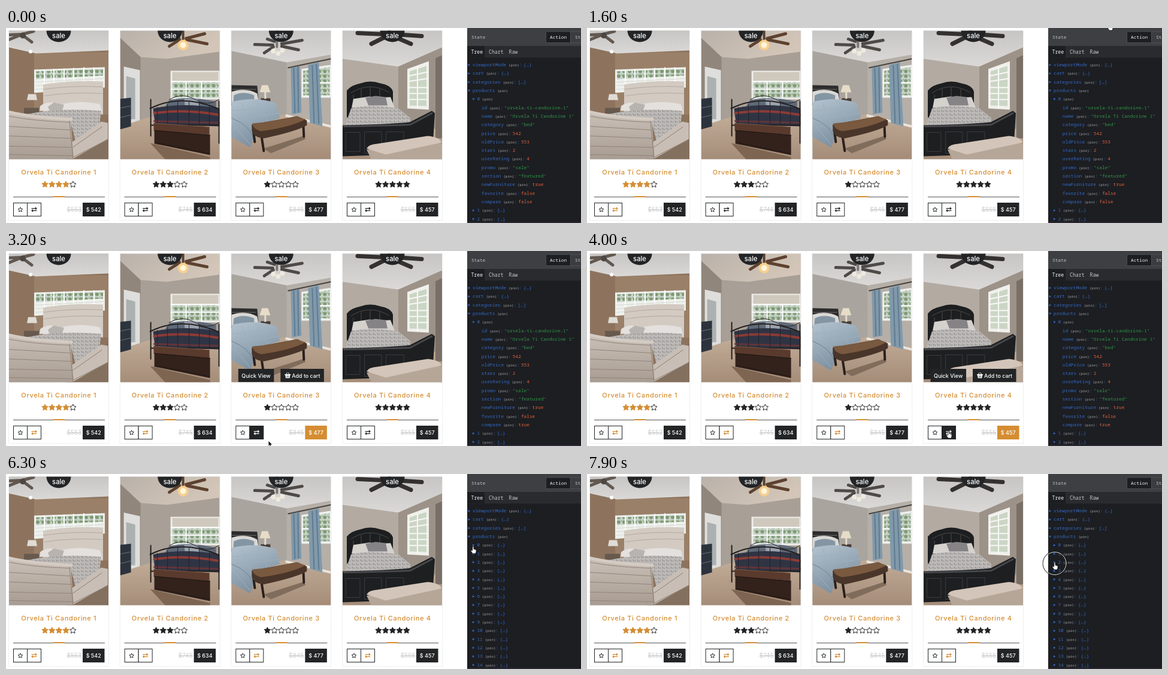
An HTML page for the animation above (8 s loop, 960 by 326 pixels).

```html
<!DOCTYPE html>
<html lang="en">
<head>
<meta charset="utf-8">
<title>Furniture shop with state inspector</title>
<style>
html, body { margin: 0; width: 100%; height: 100%; overflow: hidden; background: #fff; }
svg { display: block; width: 960px; height: 326px; }
text { font-family: Inter, "Open Sans", sans-serif; font-weight: 500; white-space: pre; }
.mono { font: 7.8px "Noto Sans Mono", "DejaVu Sans Mono", monospace; }
.tab { font-size: 8.2px; }
.pin { font-size: 5.9px; fill: #a9abad; }
.line { fill: none; stroke-linecap: round; stroke-linejoin: round; }
</style>
</head>
<body>
<svg viewBox="0 0 960 326">
<defs>
  <linearGradient id="ceiling" x2="0" y2="1"><stop stop-color="#c6c5c4"/><stop offset="1" stop-color="#dbd9d7"/></linearGradient>
  <linearGradient id="warm" x2="1" y2=".4"><stop stop-color="#b9b1aa"/><stop offset="1" stop-color="#d3c6b8"/></linearGradient>
  <linearGradient id="carpet" x2="0" y2="1"><stop stop-color="#c0ab97"/><stop offset="1" stop-color="#a48c78"/></linearGradient>
  <linearGradient id="bluebed" x2=".4" y2="1"><stop stop-color="#b4c3cf"/><stop offset="1" stop-color="#7c8f9f"/></linearGradient>
  <linearGradient id="wood" x2="0" y2="1"><stop stop-color="#c9bfb6"/><stop offset="1" stop-color="#a89c92"/></linearGradient>
  <pattern id="floral" width="7" height="6" patternUnits="userSpaceOnUse">
    <rect width="7" height="6" fill="#bdbab8"/><path d="M1 1q3 0 2 3M5 2l1 2" stroke="#83817f" fill="none"/>
  </pattern>
  <pattern id="trees" width="9" height="8" patternUnits="userSpaceOnUse">
    <rect width="9" height="8" fill="#c9d6cc"/><circle cx="3" cy="4" r="3" fill="#7f9873"/><circle cx="8" cy="2" r="1.5" fill="#9fb493"/>
  </pattern>

  <symbol id="photo0" viewBox="0 0 166 215">
    <path fill="#8d735d" d="M0 0H166V215H0z"/>
    <path fill="#9a8069" d="M42 36H166V140H42z"/>
    <path fill="url(#ceiling)" d="M0 0H166V33L45 38 0 28z"/>
    <path fill="#eef0ec" d="M42 65L160 61V95L42 104z"/>
    <path fill="url(#trees)" d="M45 68L157 64V75L45 81z"/>
    <path class="line" stroke="#fff" stroke-width="2" d="M59 66V104M75 65V103M92 64V101M108 63V100M125 62V99M142 62V98"/>
    <path class="line" stroke="#d6dad2" d="M44 86L158 80M44 92L158 86M44 98L158 91"/>
    <path fill="#d3cac2" d="M57 90Q105 82 157 85V140H57z"/>
    <path class="line" stroke="#b3a9a0" d="M58 98Q105 91 156 94M59 109Q105 102 156 105"/>
    <path fill="#e0dcd5" d="M32 106h13l2 10H30z"/><path fill="#67594d" d="M25 129h25v11H25z"/>
    <path fill="#e3e0dd" d="M52 126q13-10 35-3l3 11H51zM90 122q30-6 62 1l4 14H90z"/>
    <path fill="#b8b3ae" d="M65 127l10-7 17 4-4 11H68z"/>
    <path fill="#84705e" d="M95 190L166 150V215H95z"/>
    <path fill="url(#floral)" d="M28 140Q85 128 154 134L151 159 112 188 102 150z"/>
    <path fill="#c8beb5" d="M104 187L154 152 165 154V181L107 214z"/>
    <path class="line" stroke="#8c7f74" d="M106 212L165 182M105 196L155 161"/>
    <path fill="url(#wood)" d="M0 137Q24 145 103 148L108 215H0z"/>
    <path class="line" stroke="#d4cbc3" stroke-width="5" d="M0 136Q35 145 104 148"/>
    <path class="line" stroke="#8f847a" d="M0 143Q40 151 101 153M0 160L102 166M0 176L103 180M0 193L104 195M0 207L106 209"/>
    <path class="line" stroke="#8a7d72" d="M101 151L107 214"/>
    <path class="line" stroke="#625850" stroke-width="5" d="M0 7L22 6 41 1M22 7L38 19M20 7L0 15"/>
    <circle cx="23" cy="8" r="5" fill="#4d4743"/><circle cx="36" cy="35" r="3" fill="#fff"/>
  </symbol>

  <symbol id="photo1" viewBox="0 0 166 215">
    <path fill="#a89f96" d="M0 0H166V215H0z"/>
    <path fill="url(#warm)" d="M0 0H166V35L78 47 34 44 0 12z"/>
    <path fill="#91867c" d="M0 12L34 44V160H0z"/>
    <path fill="#dededc" d="M6 60L33 66V160H6z"/>
    <path fill="#abb0b0" d="M10 76l15 4v68H10z"/>
    <path fill="url(#carpet)" d="M0 160L50 144H166V215H0z"/>
    <path fill="#edece8" d="M84 67H166V115H84z"/>
    <path fill="#cfc9bd" d="M87 69H164V84H87z"/>
    <path fill="url(#trees)" d="M87 86H164V112H87z"/>
    <path class="line" stroke="#fff" stroke-width="2" d="M110 86V113M136 86V113M85 85H166M85 98H166"/>
    <path fill="#2c333d" d="M0 114L18 112V160L0 165z"/>
    <path class="line" stroke="#6b7176" d="M1 129L17 126M1 145L17 141"/>
    <path fill="#5f6a79" d="M82 116q35-8 78 3v18H68z"/>
    <path fill="#9ba3ae" d="M107 114h22l4 12h-25z"/>
    <path fill="#2f3444" d="M55 130Q105 119 166 130V160L58 156z"/>
    <path class="line" stroke="#8d3b36" stroke-width="4" d="M57 138Q107 130 166 141"/>
    <path class="line" stroke="#63343a" stroke-width="3" d="M57 151L166 154"/>
    <path class="line" stroke="#221f1f" stroke-width="2" d="M51 115V176M165 118V188M50 130Q102 104 165 131M52 158H165"/>
    <path class="line" stroke="#272425" d="M62 128V157M79 123V157M96 119V157M115 119V157M132 121V157M149 126V157M82 115q22-13 43 0t40 0"/>
    <path fill="#7d6552" d="M50 188L150 211V215H75z"/>
    <path fill="#593a2d" d="M56 154L149 161V174L56 167z"/>
    <path fill="#33221c" d="M57 166L150 174V208L57 189z"/>
    <path class="line" stroke="#775544" d="M57 155L149 161"/>
    <path class="line" stroke="#211713" d="M57 167L150 175M60 187L148 205"/>
    <path class="line" stroke="#5e422f" stroke-width="5" d="M98 13L70 8M110 13L141 5M99 15L82 26M111 15L145 22"/>
    <path class="line" stroke="#57402f" stroke-width="4" d="M105 0V17"/>
    <circle cx="105" cy="24" r="9" fill="#f6cf8f"/><circle cx="105" cy="24" r="5" fill="#fff5d8"/>
  </symbol>

  <symbol id="photo2" viewBox="0 0 166 215">
    <path fill="#b5afa8" d="M0 0H166V215H0z"/>
    <path fill="url(#ceiling)" d="M0 0H166V40L92 53 0 34z"/>
    <path fill="#a9a49e" d="M0 34L92 53V145H0z"/>
    <path fill="url(#carpet)" d="M0 160L92 139 166 157V215H0z"/>
    <path class="line" stroke="#e9e5df" stroke-width="4" d="M92 142L166 160"/>
    <path fill="#eef0ee" d="M117 64L166 57V112H117z"/>
    <path fill="url(#trees)" d="M120 67L164 61V108H120z"/>
    <path class="line" stroke="#fff" stroke-width="2" d="M145 60V110M118 87H166"/>
    <path class="line" stroke="#45403c" stroke-width="2" d="M95 62L166 47"/>
    <path fill="#8199aa" d="M99 62L114 59 117 137 101 140zM128 57L146 53 152 160 131 154z"/>
    <path class="line" stroke="#5f7b90" stroke-width="2" d="M104 62L106 137M111 61L112 136M135 58L138 154M142 56L146 155"/>
    <path fill="#2d2c2d" d="M0 91L43 92 46 125H0z"/>
    <path class="line" stroke="#6d6966" d="M0 98H41"/>
    <path fill="#d9d8d5" d="M0 102q24-8 43 3l3 16H0z"/>
    <path fill="#8496a3" d="M4 108q16-8 34 0v13H3z"/>
    <path fill="#453a34" d="M49 113h16v28H49z"/>
    <path fill="#e6dcc8" d="M51 91h10l4 12H47zM55 103h3v11h-3z"/>
    <path fill="url(#bluebed)" d="M0 119Q42 109 74 121L81 146 45 158 38 178 31 195 0 178z"/>
    <path class="line" stroke="#9cb0be" d="M2 134L76 126M5 149L79 138M17 121L37 172M43 117L60 150M4 158L31 190"/>
    <path class="line" stroke="#6f8393" d="M0 146Q30 158 36 178"/>
    <path fill="#806c5b" d="M54 197L120 176 124 181 66 205z"/>
    <path class="line" stroke="#2b201b" stroke-width="4" d="M37 170L39 186M50 175L54 201M120 155L121 177"/>
    <path fill="#49352a" d="M34 157L110 143 126 150V158Q110 168 54 180 36 178 34 167z"/>
    <path fill="#79593f" d="M35 155Q72 152 107 143L124 148Q100 161 50 168 36 165 35 155z"/>
    <path class="line" stroke="#4e4a47" stroke-width="5" d="M69 24L39 23M70 27L55 37M84 26L112 32M84 22L118 16M72 18L60 14"/>
    <path class="line" stroke="#7d7772" stroke-width="4" d="M76 0V27"/>
    <g fill="#efeade"><circle cx="70" cy="34" r="4"/><circle cx="78" cy="38" r="4"/><circle cx="85" cy="33" r="4"/></g>
  </symbol>

  <symbol id="photo3" viewBox="0 0 166 215">
    <path fill="#b3aaa1" d="M0 0H166V215H0z"/>
    <path fill="url(#ceiling)" d="M0 0H166V28L93 60 0 47z"/>
    <path fill="#9c9288" d="M93 60L166 28V180H93z"/>
    <path fill="url(#carpet)" d="M0 156H104L166 166V215H0z"/>
    <path fill="#f0f0ec" d="M108 64L144 51V132L108 130z"/>
    <path fill="#cbd5c5" d="M112 68L140 59V126L112 125z"/>
    <path class="line" stroke="#f8f8f5" stroke-width="2" d="M125 62V129M109 76L142 69M109 85L142 80M109 95H142M109 105H142M109 115H142"/>
    <path fill="#796f66" d="M155 46L166 41V180H155z"/>
    <path fill="#1c1e20" d="M7 100Q14 91 30 88 46 82 63 88 81 91 84 102V145H7z"/>
    <path class="line" stroke="#4a4b4d" d="M14 104Q45 84 77 103M18 107V135M31 98V129M46 95V129M62 98V129"/>
    <path fill="#d5d2ce" d="M18 114l27-4 13 2 22-1 7 18H15z"/>
    <path fill="#858386" d="M38 112l17-3 17 2 3 14H43z"/>
    <path fill="url(#floral)" d="M14 130Q46 122 93 130L113 146 112 158 4 159z"/>
    <path fill="#1d1f21" d="M0 158Q70 157 112 153L149 134 154 138 151 184 116 206 0 210z"/>
    <path class="line" stroke="#47484b" stroke-width="3" d="M2 160Q68 159 113 157L149 138"/>
    <path class="line" stroke="#3b3c3f" d="M6 170H29V202H6zM37 169H65V205H37zM73 169H102V203H73z"/>
    <path fill="#b5a698" d="M40 199L142 180 166 190V215H48z"/>
    <path fill="#d3c5b9" d="M40 197Q43 190 58 189L142 176Q163 178 165 187L72 207z"/>
    <path class="line" stroke="#343130" stroke-width="7" d="M70 6L25 4M72 10L48 22M86 10L114 22M88 6L132 9"/>
    <path class="line" stroke="#2a2827" stroke-width="5" d="M78 0V13"/>
    <circle cx="78" cy="14" r="6" fill="#ddd4c4"/>
  </symbol>
</defs>
<g id="scene"></g>
</svg>
<script>
const LOOP = 8000, STEP = 100;
const ORANGE = '#d58d32', DARK = '#222426';
const BLUE = '#3569c4', GREEN = '#319447', RED = '#e0613c';
const scene = document.getElementById('scene');

// Hover spans and the moment each product is added to the comparison
const cards = [
  { price: 542, old: 553, stars: 2, rating: 4, added: 500,
    bar: [[300, 900], [2500, 2700]], buy: [[300, 900], [2500, 2700]], press: [[300, 700]] },
  { price: 634, old: 745, stars: 3, added: 2900,
    bar: [[900, 1000], [2400, 2500], [2700, 3200]], buy: [[2700, 3100]], press: [[2800, 3100]] },
  { price: 477, old: 845, stars: 1, added: 3600,
    bar: [[3100, 3800]], buy: [[3200, 3800]], press: [[3100, 3700]] },
  { price: 457, old: 555, stars: 5, added: 4200,
    bar: [[1000, 1200], [3900, 4500]], buy: [[3900, 4500]], press: [[3900, 4400]] }
];

// Each visible pointer run: [time, x, y, isHand]
const runs = [
  [[200, 130, 260, 0], [300, 47, 300, 1], [600, 47, 300, 1], [700, 108, 259, 0],
   [800, 272, 174, 0], [900, 480, 110, 0], [1000, 640, 60, 0], [1100, 640, 60, 0]],
  [[1600, 873, -8, 1], [1800, 873, -8, 1]],
  [[2400, 175, 194, 0], [2500, 145, 220, 0], [2600, 160, 265, 0], [2800, 233, 301, 1], [3000, 233, 301, 1],
   [3100, 418, 302, 1], [3200, 438, 317, 0], [3400, 419, 301, 1], [3700, 419, 301, 1],
   [3900, 604, 301, 1], [4300, 604, 301, 1], [4500, 700, 170, 0], [4700, 850, 20, 0],
   [4800, 873, -9, 1], [5100, 873, -9, 1]],
  [[5400, 873, -8, 1], [5600, 825, 70, 0], [5800, 780, 121, 1], [6300, 780, 121, 1],
   [6500, 781, 134, 1], [7500, 781, 134, 1], [7700, 781, 148, 1], [8000, 781, 148, 1]]
];
const ringSize = { 5800: 14, 6500: 14, 6600: 20, 7300: 14, 7400: 20, 7800: 14, 7900: 20 };

const during = (spans, t) => spans.some(([a, b]) => t >= a && t < b);
const rect = (x, y, w, h, fill, more = '') =>
  `<rect x="${x}" y="${y}" width="${w}" height="${h}" fill="${fill}" ${more}/>`;
const text = (x, y, size, fill, str, more = '') =>
  `<text x="${x}" y="${y}" font-size="${size}" fill="${fill}" ${more}>${str}</text>`;
const mono = (x, y, fill, str, kind = '') =>
  `<text class="mono ${kind}" x="${x}" y="${y}" fill="${fill}">${str}</text>`;
const middle = 'text-anchor="middle"';

function star(x, y, r, fill, stroke) {
  const pts = Array.from({ length: 10 }, (_, i) => {
    const a = i * Math.PI / 5, k = i % 2 ? r * .5 : r;
    return (x + k * Math.sin(a)).toFixed(2) + ',' + (y - k * Math.cos(a)).toFixed(2);
  });
  return `<polygon points="${pts.join(' ')}" fill="${fill}" stroke="${stroke}" stroke-linejoin="round"/>`;
}

function hoverBar() {
  return rect(11.5, 192.5, 59.5, 22, DARK) + text(41.2, 207, 9, '#fff', 'Quick View', middle) +
    rect(82, 192.5, 72.5, 22, DARK) + text(101, 207, 8.9, '#fff', 'Add to cart') +
    `<path class="line" stroke="#fff" d="M91 202L93 199M97 202L95 199"/>
     <path fill="#fff" d="M89 201.5H99V203H98L97.3 208H90.7L90 203H89z"/>
     <path class="line" stroke="${DARK}" stroke-width=".6" d="M92.5 204V206.5M94 204V206.5M95.5 204V206.5"/>`;
}

function card(c, i, t) {
  const hoverStars = i === 0 && t >= 700 && t < 900;
  const pressed = during(c.press, t);
  const count = hoverStars ? 5 : c.rating ?? c.stars, starColor = c.rating ? ORANGE : DARK;
  const arrows = pressed ? '#fff' : t >= c.added ? ORANGE : DARK;
  let s = rect(-.5, 0, 167, 317, '#fff', 'stroke="#d9d9d9" stroke-width=".7" stroke-dasharray="1.5 1"');
  s += `<use href="#photo${i}" width="166" height="215"/>`;
  s += `<path fill="${DARK}" d="M62.5 0A20.5 19 0 0 0 103.5 0z"/>` + text(83, 12, 11.2, '#fff', 'sale', middle);
  if (during(c.bar, t)) s += hoverBar();
  s += text(83.3, 240, 11, ORANGE, `Orvela Ti Candorine ${i + 1}`, middle + ' letter-spacing=".65"');
  for (let n = 0; n < 5; n++) {
    const full = n < count;
    s += star(60 + n * 11.7, 257.2, 5.5, full ? starColor : '#fff', full ? starColor : DARK);
  }
  s += rect(7, 277.5, 153, 1, '#555') + rect(73.5, 276.5, 19.5, 2, ORANGE);
  const frame = `stroke="${DARK}"`;
  s += rect(7.5, 288, 23, 22, '#fff', frame) + star(19, 299.3, 4, '#fff', DARK);
  s += rect(30.5, 288, 23, 22, pressed ? DARK : '#fff', frame);
  s += `<path class="line" transform="translate(42 299)" stroke="${arrows}" stroke-width="1.2"
    d="M-4 -1.8H4L2.3 -3.3M4 -1.8L2.3 -.3M4 1.8H-4L-2.3 .3M-4 1.8L-2.3 3.3"/>`;
  s += text(121, 302.8, 10.2, '#c3c3c3', '$' + c.old,
    'text-anchor="end" text-decoration="line-through" style="font-weight:300"');
  s += rect(123, 287.5, 36.5, 23, during(c.buy, t) ? ORANGE : DARK);
  s += text(141.2, 302.5, 9, '#fff', '$ ' + c.price, middle);
  return `<g transform="translate(${5 + i * 185.67} 4.5)">${s}</g>`;
}

function fields(i, t) {
  const c = cards[i], n = i + 1;
  return Object.entries({
    id: `"orvela-ti-candorine-${n}"`, name: `"Orvela Ti Candorine ${n}"`, category: '"bed"',
    price: c.price, oldPrice: c.old, stars: c.stars, userRating: c.rating ?? 0,
    promo: '"sale"', section: '"featured"', newFurniture: true, favorite: false,
    compare: i ? t >= c.added : t >= 1700
  });
}

function treeRows(t) {
  const open = t < 6300 ? 0 : t >= 6600 && t < 7400 ? 1 : -1;
  const rows = [[0, 'viewportMode', '{…}'], [0, 'cart', '{…}'], [0, 'categories', '[…]'], [0, 'products']];
  for (let i = 0; i < 15; i++) {
    rows.push(i === open ? [1, i] : [1, i, '{…}']);
    if (i === open) rows.push(...fields(i, t).map(([k, v]) => [2, k, v]));
  }
  return rows.slice(0, 19);
}

function treeRow([level, key, value], i) {
  const x = 779 + level * 7.4, y = 61.6 + i * 14.3;
  const color = level < 2 ? BLUE : typeof value === 'string' ? GREEN : RED;
  const branch = value === undefined ? 'M-2 -1.5H2L0 2z' : 'M-1.5 -2V2L2 0z';
  const tail = value === undefined ? '' :
    `<tspan fill="${BLUE}">:</tspan><tspan dx="2.3" fill="${color}">${value}</tspan>`;
  return (level < 2 ? `<path transform="translate(${x - 6} ${y + .2})" fill="${BLUE}" d="${branch}"/>` : '') +
    mono(x, y + 2.5, BLUE, `${key}<tspan class="pin" dx="4">(pin)</tspan>${tail}`);
}

function inspector(t) {
  return rect(770, 0, 190, 326, '#1c1e22') + rect(770, 0, 190, 30, '#3d3f42') +
    rect(770, 30, 190, 19.5, '#292b2e') + rect(770, 30, 29, 19.5, '#1c1e22') +
    rect(770, 324, 190, 2, '#2a2830') +
    rect(901.5, 6, 41, 18.5, '#1c1e21', 'stroke="#55585b" stroke-width=".7"') +
    rect(942.5, 6, 20, 18.5, '#3a3c3f', 'stroke="#55585b" stroke-width=".7"') +
    mono(777, 18, '#c0c2c4', 'State') + mono(908, 18, '#f0f1f2', 'Action') + mono(950, 18, '#c0c2c4', 'State') +
    mono(776.5, 42.5, '#f2f3f4', 'Tree', 'tab') + mono(806, 42.5, '#c9cbcd', 'Chart', 'tab') +
    mono(839.5, 42.5, '#c9cbcd', 'Raw', 'tab') +
    treeRows(t).map(treeRow).join('');
}

function pointer(t) {
  const run = runs.find(r => t >= r[0][0] && t < r.at(-1)[0]);
  if (!run) return '';
  const n = run.findIndex(k => k[0] > t), [t0, x0, y0, hand] = run[n - 1], [t1, x1, y1] = run[n];
  const p = (t - t0) / (t1 - t0), x = x0 + (x1 - x0) * p, y = y0 + (y1 - y0) * p;
  const r = ringSize[t];
  const ring = r ? `<circle cx="${x}" cy="${y + 1.5}" r="${r}" fill="none" stroke="#111"/>
    <circle cx="${x}" cy="${y + 1.5}" r="${r - 1}" fill="none" stroke="#ddd"/>` : '';
  const shape = hand
    ? '<path fill="#fff" stroke="#111" stroke-width=".8" d="M-1 0Q0-1 1 .5V4.5L5 5.5V9L4 12H-1L-4 7.5Q-4 6-1.5 7z"/>'
    : '<path fill="#111" stroke="#fff" stroke-width=".9" d="M0 0V9.5L2.2 7.5 3.8 11 5.5 10.2 4 7H7z"/>';
  return ring + `<g transform="translate(${x} ${y})">${shape}</g>`;
}

let shown = -1;
function tick() {
  const t = Math.floor(performance.now() % LOOP / STEP) * STEP;
  if (t !== shown) {
    shown = t;
    scene.innerHTML = cards.map((c, i) => card(c, i, t)).join('') + inspector(t) + pointer(t);
  }
  requestAnimationFrame(tick);
}
tick();
</script>
</body>
</html>
```
